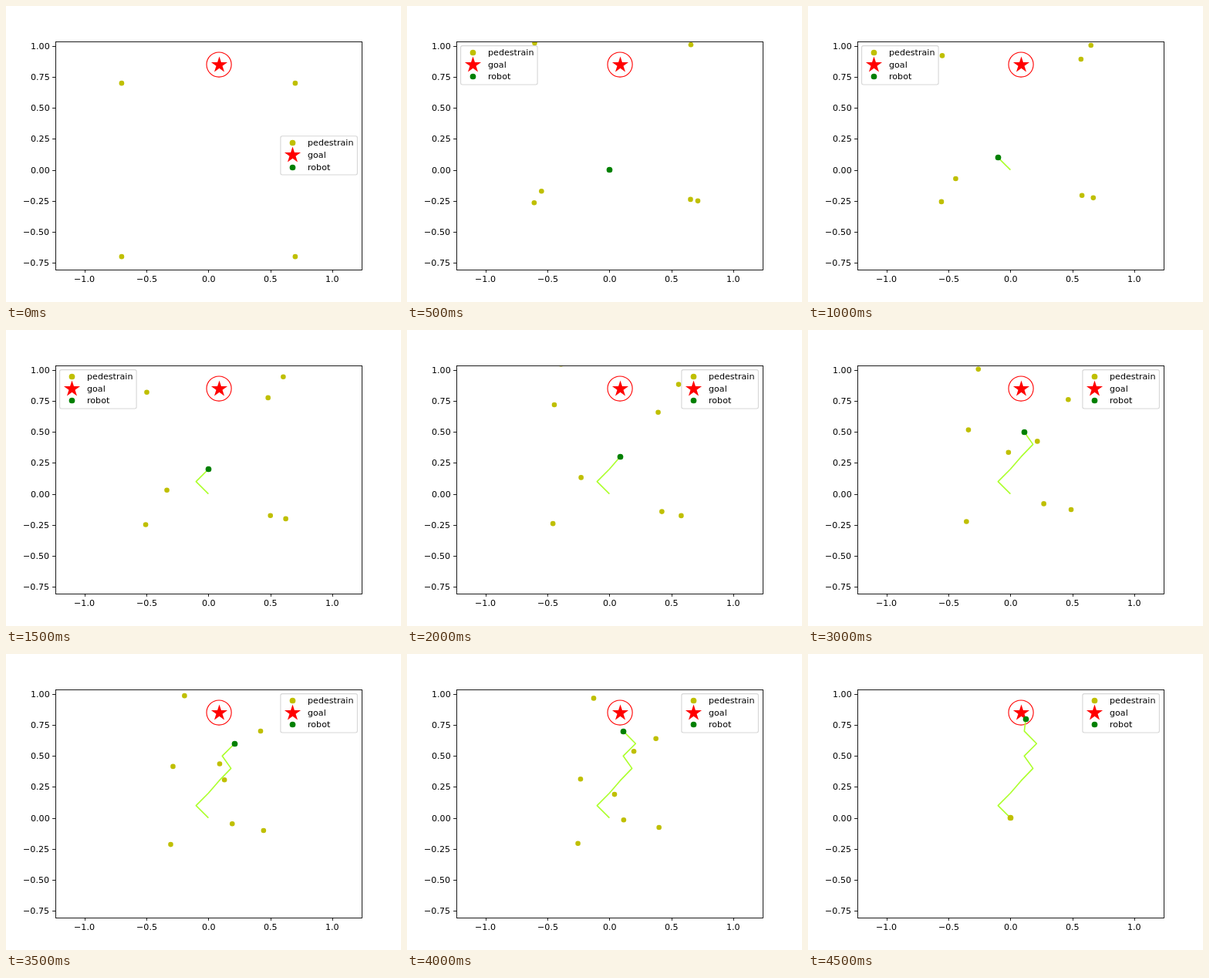
Animation, 512 px wide and 384 px high, one loop 5000 ms. Source, as an HTML page with a canvas:

```html
<!DOCTYPE html>
<html lang="en">
<head>
<meta charset="utf-8">
<title>Robot among pedestrians</title>
<style>
html, body { margin: 0; width: 100%; height: 100%; overflow: hidden; background: #fff; }
canvas { display: block; width: 512px; height: 384px; }
</style>
</head>
<body>
<canvas id="stage" width="512" height="384"></canvas>
<script>
const ctx = document.getElementById('stage').getContext('2d');
const STEP = 500, STEPS = 10, LAST = STEPS - 1;
const UNIT = 160.7, X0 = 262.4, Y0 = 212.65;
const BOX = [64.5, 46.5, 397, 296];
const YELLOW = '#bfbf00', RED = '#ff0000', GREEN = '#008000', TRAIL = '#adff2f';
const GOAL = [0.085, 0.85];

// Straight walks in plot units: from (step 1) and to (step 8).
const walks = [
  { from: [-0.603, 1.024], to: [-0.233, 0.314] },
  { from: [0.695, 1.067], to: [0.375, 0.64] },
  { from: [0.657, 1.011], to: [0.041, 0.19] },
  { from: [-0.548, -0.172], to: [0.197, 0.538] },
  { from: [-0.607, -0.265], to: [-0.254, -0.206] },
  { from: [0.654, -0.238], to: [0.115, -0.016] },
  { from: [0.713, -0.25], to: [0.4, -0.077] },
  { from: [-0.589, 1.109], to: [-0.127, 0.966] }
];

// The robot climbs 0.1 per step while it swerves sideways.
const swerve = [0, -0.1, 0, 0.086, 0.182, 0.111, 0.211, 0.112, 0.123];
const route = swerve.map((x, i) => [x, i / 10]);

const toPx = ([x, y]) => [X0 + x * UNIT, Y0 - y * UNIT];
const snap = v => Math.floor(v) + 0.5;
const lerp = (a, b, t) => a + (b - a) * t;

function dot(x, y, r, color) {
  ctx.fillStyle = color;
  ctx.beginPath();
  ctx.arc(x, y, r, 0, Math.PI * 2);
  ctx.fill();
}

function star(x, y) {
  ctx.beginPath();
  for (let i = 0; i < 10; i++) {
    const r = i % 2 ? 4.24 : 11.1;
    const a = i * Math.PI / 5;
    ctx.lineTo(x + r * Math.sin(a), y - r * Math.cos(a));
  }
  ctx.fillStyle = RED;
  ctx.fill();
}

function line(x1, y1, x2, y2) {
  ctx.beginPath();
  ctx.moveTo(x1, y1);
  ctx.lineTo(x2, y2);
  ctx.stroke();
}

// Text starts on whole pixels; shift is the share of its width left of x.
function label(text, x, y, shift = 0) {
  ctx.fillStyle = '#000';
  ctx.fillText(text, Math.round(x - ctx.measureText(text).width * shift), Math.round(y));
}

const signed = (v, digits) => v.toFixed(digits).replace('-', '\u2212');

function drawAxes() {
  ctx.strokeStyle = '#000';
  ctx.lineWidth = 0.89;
  ctx.lineJoin = 'miter';
  ctx.strokeRect(...BOX);
  for (let v = -1; v <= 1; v += 0.5) {
    const x = X0 + v * UNIT, tickX = Math.round(x) + 0.5;
    line(tickX, 342, tickX, 345.9);
    label(signed(v, 1), x, 358, 0.5);
  }
  for (let v = -0.75; v <= 1; v += 0.25) {
    const y = Math.round(Y0 - v * UNIT) + 0.5;
    line(60.1, y, 64, y);
    label(signed(v, 2), 56.3, y + 3.5, 1);
  }
}

function drawLegend(left, top) {
  ctx.beginPath();
  ctx.roundRect(left, top, 99.5, 50.3, 2.2);
  ctx.fillStyle = 'rgba(255,255,255,0.8)';
  ctx.strokeStyle = 'rgba(204,204,204,0.8)';
  ctx.lineWidth = 1.11;
  ctx.fill();
  ctx.stroke();
  const x = snap(left + 15.5);
  const rows = [
    ['pedestrain', y => dot(x, y, 3.85, YELLOW)],
    ['goal', y => star(x, y)],
    ['robot', y => dot(x, y, 3.85, GREEN)]
  ];
  rows.forEach(([text, mark], i) => {
    const base = Math.round(top + 12.5 + i * 15.65);
    mark(base - 3.5);
    label(text, left + 35.5, base);
  });
}

function walkerSpots(step) {
  if (step === 0) return [-0.7, 0.7].flatMap(x => [-0.7, 0.7].map(y => [x, y]));
  if (step === LAST) return [];
  const t = (step - 1) / 7;
  return walks.map(({ from, to }) => from.map((v, i) => lerp(v, to[i], t)));
}

function drawRobot(step) {
  const path = route.slice(0, step).map(toPx);
  ctx.strokeStyle = TRAIL;
  ctx.lineWidth = 1.67;
  ctx.lineJoin = 'round';
  ctx.beginPath();
  path.forEach(p => ctx.lineTo(...p));
  ctx.stroke();
  dot(...path[step - 1].map(snap), 3.85, GREEN);
}

function drawScene(step) {
  ctx.fillStyle = '#fff';
  ctx.fillRect(0, 0, 512, 384);

  ctx.save();
  ctx.beginPath();
  ctx.rect(...BOX);
  ctx.clip();
  for (const spot of walkerSpots(step)) dot(...toPx(spot), 3.3, YELLOW);

  const goal = toPx(GOAL);
  ctx.strokeStyle = RED;
  ctx.lineWidth = 1.11;
  ctx.beginPath();
  ctx.arc(...goal, 16.07, 0, Math.PI * 2);
  ctx.stroke();
  star(...goal.map(snap));

  if (step > 0) drawRobot(step);
  if (step === LAST) dot(...toPx([0, 0]).map(snap), 3.85, YELLOW);
  ctx.restore();

  drawAxes();
  drawLegend(step > 0 && step < 4 ? 69.6 : 355.9, step ? 51.64 : 168.75);
}

const start = performance.now();
let shown = -1;

function tick() {
  const step = Math.floor((performance.now() - start) / STEP) % STEPS;
  if (step !== shown) {
    shown = step;
    drawScene(step);
  }
  requestAnimationFrame(tick);
}

ctx.font = '11.11px "DejaVu Sans", sans-serif';
tick();
</script>
</body>
</html>
```
